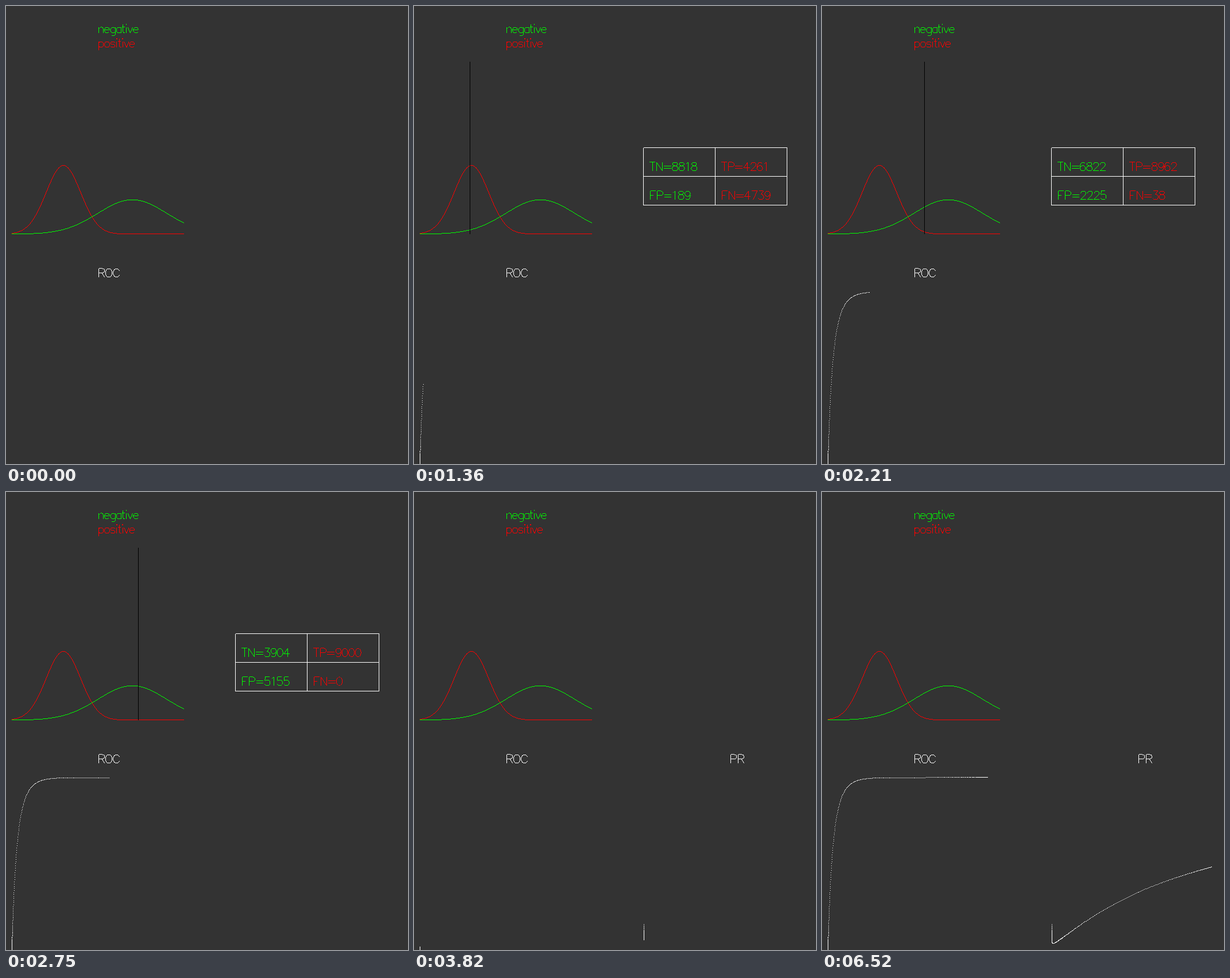
Write a matplotlib script that moves like this. It is 700 by 797 pixels and loops after 7.45 s.

```python
import math
import numpy as np
import matplotlib.pyplot as plt
from matplotlib.animation import FuncAnimation

W, H, DPI = 700, 797, 100
LOOP, INTERVAL = 7450, 25
GRAY, BLACK, WHITE = (51, 51, 51), (0, 0, 0), (255, 255, 255)
RED, GREEN = (255, 0, 0), (0, 255, 0)
TOTAL, SPAN = 9000, 300
POS, NEG = (90, 30), (210, 60)      # mean and deviation of each class


# --- pixel drawing, y grows upwards from the bottom edge -----------------

def centres(a, b):
    """Pixels whose centre lies between a and b."""
    lo, hi = sorted((a, b))
    return np.arange(math.ceil(lo - .5), math.ceil(hi - .5))


def line(img, x0, y0, x1, y1, color):
    dx, dy = x1 - x0, y1 - y0
    if abs(dx) >= abs(dy):
        xs = centres(x0, x1)
        ys = np.floor(y0 + (xs + .5 - x0) * dy / (dx or 1)).astype(int)
    else:
        ys = centres(y0, y1)
        xs = np.ceil(x0 + (ys + .5 - y0) * dx / dy).astype(int) - 1
    img[H - 1 - ys, xs] = color


def polyline(img, points, color):
    for p, q in zip(points, points[1:]):
        line(img, *p, *q, color)


# --- stroke font: capitals are 21 units high -----------------------------

def L(*xy):
    return list(zip(xy[::2], xy[1::2]))


def A(cx, cy, rx, ry, start=0, end=360):
    angles = np.radians(np.linspace(start, end, 17))
    return [(cx + rx * math.cos(a), cy + ry * math.sin(a)) for a in angles]


BOWL = A(6.5, 7, 6.5, 7, 35, 325)
CAP_HEIGHT = 15
UNIT, PERCENT = CAP_HEIGHT / 21, CAP_HEIGHT / 100

# character: (advance and left bearing in % of the capital height, strokes)
LETTERS = {
    "n": (70.9, 9.2, [L(0, 0, 0, 14), L(0, 10, 3, 13, 5, 14, 8, 14, 10, 13, 11, 10, 11, 0)]),
    "e": (68.5, 5.7, [L(0, 8, 12, 8), A(6.2, 7, 6.2, 7, 10, 325)]),
    "g": (71, 5.8, [L(12, 14, 12, -2), A(7, -2, 5, 5, 0, -140), BOWL]),
    "a": (66.6, 4, [L(12, 14, 12, 0), BOWL]),
    "t": (39.3, .5, [L(0, 14, 7, 14), L(3, 21, 3, 4, 4, 1, 6, 0, 8, 0)]),
    "i": (28.9, 9.6, [L(1, 0, 1, 14), L(0, 21, 1, 20, 2, 21, 1, 22, 0, 21)]),
    "v": (60.6, 1.7, [L(0, 14, 6, 0, 12, 14)]),
    "p": (70.8, 9, [L(0, 14, 0, -7), A(5.5, 7, 6.5, 7, 145, -145)]),
    "o": (71.7, 4.9, [A(6.5, 7, 6.5, 7)]),
    "s": (62.3, 5, [A(5.5, 10.8, 5.5, 3.2, 10, 230), L(2, 8.4, 8, 7),
                    A(5.5, 3.5, 5.5, 3.5, 60, -170)]),
    "R": (82.4, 11.7, [L(0, 0, 0, 21, 9, 21), A(9, 16, 5, 5, 90, -90),
                       L(9, 11, 0, 11), L(7, 11, 14, 0)]),
    "O": (88.8, 6.3, [A(8, 10.5, 8, 10.5)]),
    "C": (84.5, 5.8, [A(8, 10.5, 8, 10.5, 30, 330)]),
    "P": (85.7, 12, [L(0, 0, 0, 21, 9, 21), A(9, 15.5, 5, 5.5, 90, -90),
                     L(9, 10, 0, 10)]),
    "T": (71.9, 2.6, [L(0, 21, 14, 21), L(7, 21, 7, 0)]),
    "N": (88.8, 11.1, [L(0, 0, 0, 21, 14, 0, 14, 21)]),
    "F": (78.7, 11.5, [L(0, 0, 0, 21), L(0, 21, 13, 21), L(0, 11, 8, 11)]),
}
SYMBOLS = {
    "=": (97.3, 5.7, [L(0, 12, 18, 12), L(0, 6, 18, 6)]),
    "0": (77.1, 5.2, [A(7, 10.5, 7, 10.5)]),
    "1": (66.5, 11.8, [L(0, 17, 2, 18, 5, 21, 5, 0)]),
    "2": (77.6, 5.4, [A(7, 15.5, 6, 5.5, 175, -27), L(12.3, 13, 10, 10, 0, 0, 14, 0)]),
    "3": (77, 5.2, [L(2, 21, 13, 21, 7, 13), A(7, 6.5, 7, 6.5, 90, -155)]),
    "4": (80.2, 3.9, [L(10, 0, 10, 21, 0, 7, 15, 7)]),
    "5": (77.7, 4.9, [L(12, 21, 2, 21, 1, 12), A(7, 7, 7, 7, 140, -155)]),
    "6": (73.8, 5.6, [A(6.5, 6.5, 6.5, 6.5), A(7, 10.5, 7, 10.5, 45, 200)]),
    "7": (77.2, 5.5, [L(0, 21, 14, 21, 4, 0)]),
    "8": (77.6, 5.4, [A(7, 16.7, 6, 4.3), A(7, 6.2, 7, 6.2)]),
    "9": (74.1, 6, [A(6.5, 14.5, 6.5, 6.5), A(6, 10.5, 7, 10.5, 20, -135)]),
}
GLYPHS = LETTERS | SYMBOLS


def text(img, x, y, string, color):
    for char in string:
        advance, bearing, strokes = GLYPHS[char]
        left = x + bearing * PERCENT
        for stroke in strokes:
            polyline(img, [(left + u * UNIT, y + v * UNIT) for u, v in stroke], color)
        x += advance * PERCENT


# --- statistics ----------------------------------------------------------

def count_below(threshold, mean, dev):
    return TOTAL / 2 * (1 + math.erf((threshold - mean) / dev / math.sqrt(2)))


def density(x, mean, dev):
    return TOTAL * math.exp(-((x - mean) / dev) ** 2 / 2) / (dev * math.sqrt(2 * math.pi))


def plot_pixel(share):
    """Pixel offset of a share of the plot side, with 1/256 sub-pixel precision."""
    return np.floor(np.round(share * SPAN * 256) / 256).astype(int)


tp = np.array([count_below(t, *POS) for t in range(SPAN)])
fp = np.array([count_below(t, *NEG) for t in range(SPAN)])
rate_x = plot_pixel(fp / TOTAL)
roc_row = H - 1 - plot_pixel(tp / TOTAL)
pr_row = H - 1 - plot_pixel(fp / (fp + tp))


# --- timeline ------------------------------------------------------------

# Runs of picture changes: first time, last time, number of changes
RUNS = [(500, 1210, 10), (1290, 1990, 10), (2070, 2750, 10), (2820, 3520, 10),
        (3590, 4280, 10), (4360, 5060, 10), (5140, 5830, 10), (5910, 6520, 9)]
TICKS = np.array([a + (b - a) * i // (n - 1) // 10 * 10
                  for a, b, n in RUNS for i in range(n)])
SECOND_SWEEP = 3590
SWEEP_1 = ([500, 980, 1210, 1670, 1990, 2750, 3520],
           [1, 49, 72, 119, 145, 220, 298])
SWEEP_2 = ([3590, 3820, 5060, 5140, 5830, 6520],
           [5, 28, 152, 160, 229, 298])


def make_base():
    img = np.empty((H, W, 3), np.uint8)
    img[:] = GRAY
    text(img, 160, 750, "negative", GREEN)
    text(img, 160, 725, "positive", RED)
    text(img, 160, 325, "ROC", WHITE)
    for params, color in ((POS, RED), (NEG, GREEN)):
        polyline(img, [(10 + x, 400 + density(x, *params))
                       for x in range(SPAN + 1)], color)
    return img


def draw_table(img, k):
    for x in (400, 525, 650):
        line(img, x, 450, x, 550, WHITE)
    for y in (450, 500, 550):
        line(img, 400, y, 650, y, WHITE)
    hits, false_hits = count_below(k + 1, *POS), count_below(k + 1, *NEG)
    text(img, 410, 510, f"TN={round(TOTAL - fp[k])}", GREEN)
    text(img, 410, 460, f"FP={round(false_hits)}", GREEN)
    text(img, 535, 510, f"TP={round(hits)}", RED)
    text(img, 535, 460, f"FN={round(TOTAL - hits)}", RED)


BASE = make_base()


def render(ms):
    img = BASE.copy()
    passed = TICKS[TICKS <= ms]
    if not len(passed):
        return img
    tick = passed[-1]
    second = tick >= SECOND_SWEEP
    k = int(round(np.interp(tick, *(SWEEP_2 if second else SWEEP_1))))
    img[roc_row[:k + 1], 10 + rate_x[:k + 1]] = WHITE
    if second:
        text(img, 550, 325, "PR", WHITE)
        img[pr_row[:k + 1], 400 + rate_x[:k + 1]] = WHITE
    else:
        line(img, 11 + k, 400, 11 + k, 700, BLACK)
        draw_table(img, k)
    return img


fig = plt.figure(figsize=(W / DPI, H / DPI), dpi=DPI, facecolor="#333333")
ax = fig.add_axes([0, 0, 1, 1])
ax.axis("off")
picture = ax.imshow(BASE, interpolation="nearest", aspect="auto")


def update(frame):
    picture.set_data(render(frame * INTERVAL + 20))
    return [picture]


anim = FuncAnimation(fig, update, frames=LOOP // INTERVAL, interval=INTERVAL,
                     repeat=True, repeat_delay=0, blit=False)
plt.show()
```
